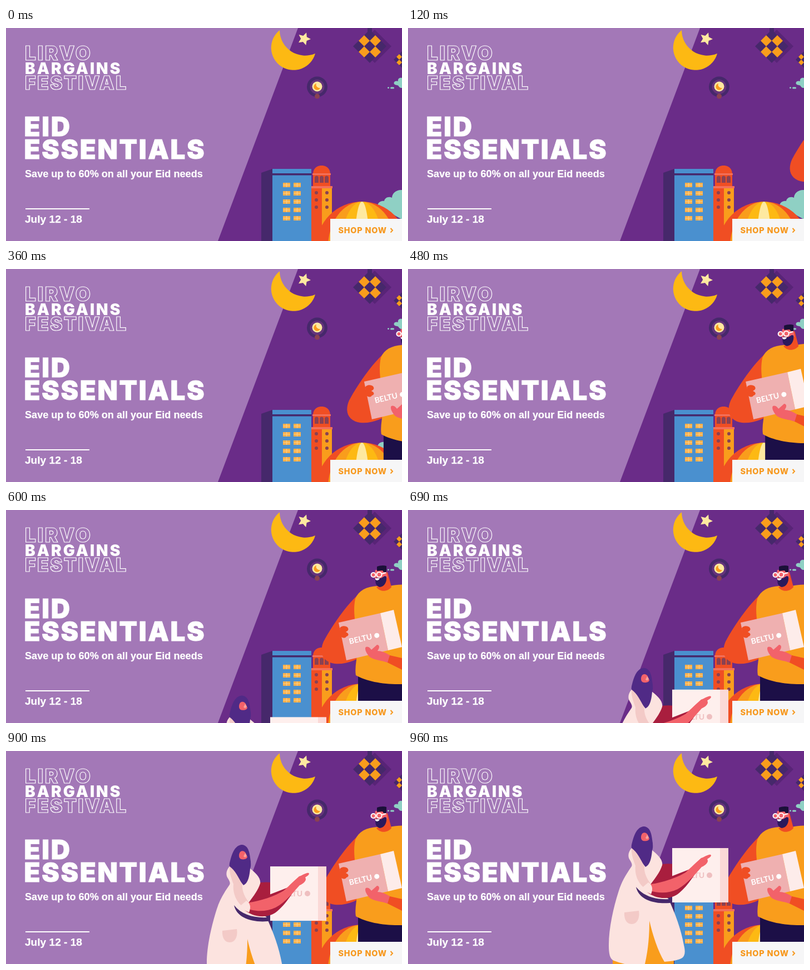
Write an HTML page that moves like this. It is 712 px wide and 384 px high and loops after 2830 ms.

```html
<!DOCTYPE html>
<html lang="en">
<head>
<meta charset="utf-8">
<title>Eid Essentials</title>
<style>
  html, body { margin: 0; width: 100%; height: 100%; overflow: hidden; background: #a378b7; }
  svg { display: block; width: 712px; height: 384px; }
  .heavy { font-family: Inter, "Liberation Sans", sans-serif; font-weight: 900; }
  .plain { font-family: "Liberation Sans", Arial, sans-serif; font-weight: 700; stroke: #fff; stroke-width: .25; }
  .brand { font-family: Lato, Inter, sans-serif; font-weight: 700; font-size: 14px; }
  .outline { fill: none; stroke: #fff; stroke-width: 1.2; }
  .indigo { fill: #46286b; }
  .violet { fill: #502a86; }
  .red { fill: #f04e23; }
  .crimson { fill: #a91e3e; }
  .orange { fill: #f99d1c; }
  .yellow { fill: #fdb913; }
  .pale { fill: #fee9a0; }
  .teal { fill: #8fd0c4; }
  .brown { fill: #8a4152; }
  .skin { fill: #f2626a; }
  .robe { fill: #fce3df; }
  .fold { fill: #f3cac7; }
</style>
</head>
<body>
<svg viewBox="0 0 712 384">
  <defs>
    <g id="charm">
      <path class="indigo" d="M0-30 30 0 0 30-30 0Z"/>
      <path class="orange" d="M-10-20 0-10-10 0-20-10ZM10-20 20-10 10 0 0-10ZM-10 0 0 10-10 20-20 10ZM10 0 20 10 10 20 0 10Z"/>
    </g>
  </defs>

  <rect width="712" height="384" fill="#a378b7"/>
  <path fill="#6a2c88" d="M525 0H712V384H381Z"/>

  <g id="sky">
    <path class="yellow" d="M492 4A40.3 40.3 0 1 0 556 46A46 46 0 0 1 492 4Z"/>
    <polygon id="star" class="pale"/>
    <path fill="#582477" d="M663 3 693 33 663 63 633 33Z"/>
    <path class="indigo" d="M650 0h8v8h-8Z"/>
    <use href="#charm" x="654" y="33"/>
    <use href="#charm" transform="translate(712 57) scale(.5)"/>
    <circle class="indigo" cx="559.5" cy="106" r="18.5"/>
    <circle fill="#65347c" cx="559.5" cy="106" r="13"/>
    <circle class="pale" cx="559.5" cy="105.5" r="9"/>
    <path class="orange" d="M558 100A6 6 0 1 0 565 108A6 6 0 0 1 558 100Z"/>
    <circle class="brown" cx="559.5" cy="123" r="4.5"/>
    <path class="teal" d="M712 90c-5-1-8 2-7 6-5-2-9 2-7 5 3 3 7 1 8 4 2 3 4 3 6 3Z"/>
    <rect class="teal" x="686" y="106.5" width="3" height="2.5" rx="1"/>
    <rect class="teal" x="691" y="106.5" width="7" height="3" rx="1.5"/>
  </g>

  <g id="city">
    <path class="teal" d="M712 292c-10-1-18 6-18 14-6-3-13 0-14 6-6-1-12 3-12 9l44 24Z"/>
    <path class="indigo" d="M459 261 479 254V384H459Z"/>
    <rect x="479" y="254" width="70" height="130" fill="#4a90cf"/>
    <path class="indigo" d="M479 262H549V265.500H479Z"/>
    <g id="windows"></g>
    <path class="red" d="M552 264C552 253 559 248 567.500 248S583 253 583 264V286H552Z"/>
    <path fill="#f3705a" d="M551 262h33v3h-33ZM549 285h38v4h-38Z"/>
    <path class="brown" d="M555 279v-9a3.500 3.500 0 0 1 7 0v9ZM564 279v-9a3.500 3.500 0 0 1 7 0v9ZM573 279v-9a3.500 3.500 0 0 1 7 0v9Z"/>
    <path class="red" d="M549 289h19v95h-19Z"/>
    <path class="orange" d="M568 289h18v95h-18Z"/>
    <g id="portholes" class="brown"></g>
    <g id="dome"></g>
  </g>

  <g id="man">
    <path fill="#1c0f47" d="M633 298H870V384H633Z"/>
    <path class="red" d="M641 146C618 163 588 205 571 237C562 258 570 274 591 277C612 279 632 270 648 258Z"/>
    <path class="orange" d="M667 137C648 138 634 145 628 160C623 185 629 205 632 235C634 260 626 280 629 298C648 309 680 315 712 314H870V140C760 140 720 130 690 137Z"/>
    <path class="red" d="M672 120 686 112 693 139C687 147 673 149 666 139L673 135Z"/>
    <path class="skin" d="M664 108 684 108 686 122 668 131 662 121Z"/>
    <path fill="#1a1038" d="M667 102C672 100 679 99 684 101L684 112H679L677 109 667 110Z"/>
    <path fill="#2b195c" d="M665 122 674 123 681 119 684 120C685 129 681 138 672 139C665 137 663 131 665 122Z"/>
    <path fill="#fff" d="M664 123h8c-1 4-6 5-8 2Z"/>
    <g class="skin" stroke="#fff" stroke-width="2">
      <circle cx="660.5" cy="117" r="4"/><circle cx="671" cy="116.5" r="4.500"/>
      <path d="M676 115 683 113"/>
    </g>
    <path fill="#efb0b0" d="M598 203 673 186 687 253 612 271Z"/>
    <path fill="#fdecea" d="M673 186 697 180 712 247 687 253Z"/>
    <g transform="translate(618 242) rotate(-13)" fill="#fff">
      <text class="brand">BELTU</text>
      <circle cx="51" cy="-4.500" r="4.500"/>
    </g>
    <path class="red" d="M600 214C601 208 613 208 615 213C617 217 612 219 611 220C617 222 617 227 612 228C610 232 603 231 602 227Z"/>
    <path class="red" d="M686 261 712 267 790 280V305L712 288 684 274Z"/>
    <path class="skin" d="M654 265C648 259 644 250 647 247C651 245 655 249 657 252L667 243C671 243 673 247 668 254C676 254 684 258 690 262L686 275C675 271 663 271 654 265Z"/>
  </g>

  <g id="woman">
    <path class="orange" d="M368 368 434 300 478 368V400H368Z"/>
    <path class="crimson" d="M449 206C462 202 476 203 490 206V240L432 245Z"/>
    <path class="robe" d="M402 175C396 182 395 189 398 195C401 200 404 204 402 208C391 224 384 236 379 252C370 280 361 318 361 350C361 366 363 375 370 378C384 383 400 388 425 388C432 360 434 332 434 306C440 332 449 360 461 380C475 379 486 377 493 373C498 369 499 362 496 350C491 322 481 294 468 266L432 246C443 231 453 219 457 206C459 196 448 186 439 179Z"/>
    <path class="violet" d="M424 136C412 137 407 150 403 165C401 172 401 176 405 180C414 188 418 198 427 209C436 205 438 190 439 179C441 174 440 170 440 166C438 152 437 137 424 136Z"/>
    <path class="skin" d="M421 149C424 146 429 147 431 151L434 158C433 162 428 163 423 162C418 161 418 153 421 149Z"/>
    <path fill="#f9a19c" d="M430 151 433 156 430 159 427 157Z"/>
    <path class="fold" d="M402 175C412 182 418 195 425 208C424 220 430 231 436 239L430 250C414 242 407 222 409 207C406 199 401 187 402 175Z"/>
    <path class="fold" d="M389 291 415 288C417 300 413 312 402 312C393 312 388 303 389 291Z"/>
    <path class="indigo" d="M410 245C425 264 451 270 480 266L479 273C445 278 415 269 410 245Z"/>
    <rect x="475" y="175" width="86" height="98" fill="#feefed"/>
    <rect x="561" y="175" width="15" height="98" fill="#fbd9d7"/>
    <g fill="#efbfc0">
      <text class="brand" x="491" y="229">BELTU</text>
      <circle cx="542" cy="224" r="5"/>
    </g>
    <path class="crimson" d="M430 243 527 205C514 225 501 246 485 258C467 270 442 266 427 252Z"/>
    <path class="skin" d="M430 241C448 239 475 233 499 219C509 210 518 201 527 193C535 190 543 184 545 188C545 191 540 193 538 195C541 199 537 205 528 209C514 225 501 240 485 249C467 258 443 257 428 248Z"/>
    <path class="robe" d="M432 237C439 241 441 248 437 258L418 249Z"/>
  </g>

  <rect x="583" y="344" width="129" height="40" fill="#f6f6f7"/>
  <text x="597.5" y="369.5" font-size="14.4" letter-spacing=".8" fill="#f7981d" style="font-family:Inter,sans-serif;font-weight:800">SHOP NOW</text>
  <path d="M691.500 361 695 364.800 691.500 368.600" fill="none" stroke="#f7981d" stroke-width="2"/>

  <g fill="#fff">
    <g class="heavy">
      <text class="outline" x="34" y="58" font-size="35" letter-spacing="3">LIRVO</text>
      <text x="34" y="83" font-size="28" letter-spacing="3">BARGAINS</text>
      <text class="outline" x="34" y="111" font-size="33.5" letter-spacing="2.6">FESTIVAL</text>
      <g font-size="47.5" letter-spacing="2.6" stroke="#fff" stroke-width=".8">
        <text x="32.5" y="194.500">EID</text>
        <text x="32.5" y="235.500">ESSENTIALS</text>
      </g>
    </g>
    <g class="plain">
      <text x="34" y="269" font-size="18.1">Save up to 60% on all your Eid needs</text>
      <text x="34" y="351" font-size="19.1">July 12 - 18</text>
    </g>
    <rect x="35" y="325" width="115" height="2"/>
  </g>
</svg>
<script>
  const LOOP = 2830, STEP = 30;
  const byId = id => document.getElementById(id);

  function add(parent, tag, attrs) {
    const node = document.createElementNS("http://www.w3.org/2000/svg", tag);
    for (const key in attrs) node.setAttribute(key, attrs[key]);
    byId(parent).append(node);
  }

  byId("star").setAttribute("points", Array.from({ length: 10 }, (_, i) => {
    const angle = (i * 36 - 70) * Math.PI / 180, radius = i % 2 ? 5.8 : 12;
    return `${536 + radius * Math.cos(angle)},${19.5 + radius * Math.sin(angle)}`;
  }).join(" "));

  for (let row = 0; row < 5; row++) {
    for (const x of [498, 517]) {
      const y = 279 + row * 15;
      add("windows", "rect", { x, y, width: 13, height: 8, fill: "#fcb04c" });
      add("windows", "path", { d: `M${x} ${y + 4}h13M${x + 6.5} ${y}v8`, stroke: "#fdd28c" });
    }
  }
  for (const cy of [297, 310, 323])
    for (const cx of [558, 577]) add("portholes", "circle", { cx, cy, r: 3 });
  [["red", 82], ["orange", 61], ["yellow", 37], ["pale", 13]].forEach(([name, rx]) =>
    add("dome", "ellipse", { class: name, cx: 640, cy: 395, rx, ry: 82 }));

  // Linear travel from `distance` to zero between two times.
  const remaining = (time, from, to, distance) =>
    distance * (1 - Math.min(1, Math.max(0, (time - from) / (to - from))));

  function draw(time) {
    byId("man").setAttribute("transform", `translate(${remaining(time, 0, 510, 156)} 0)`);
    byId("woman").setAttribute("transform", `translate(0 ${remaining(time, 510, 960, 248)})`);
  }

  const start = performance.now();
  function tick() {
    const time = (performance.now() - start) % LOOP;
    draw(Math.floor(time / STEP) * STEP);
    requestAnimationFrame(tick);
  }
  tick();
</script>
</body>
</html>
```
